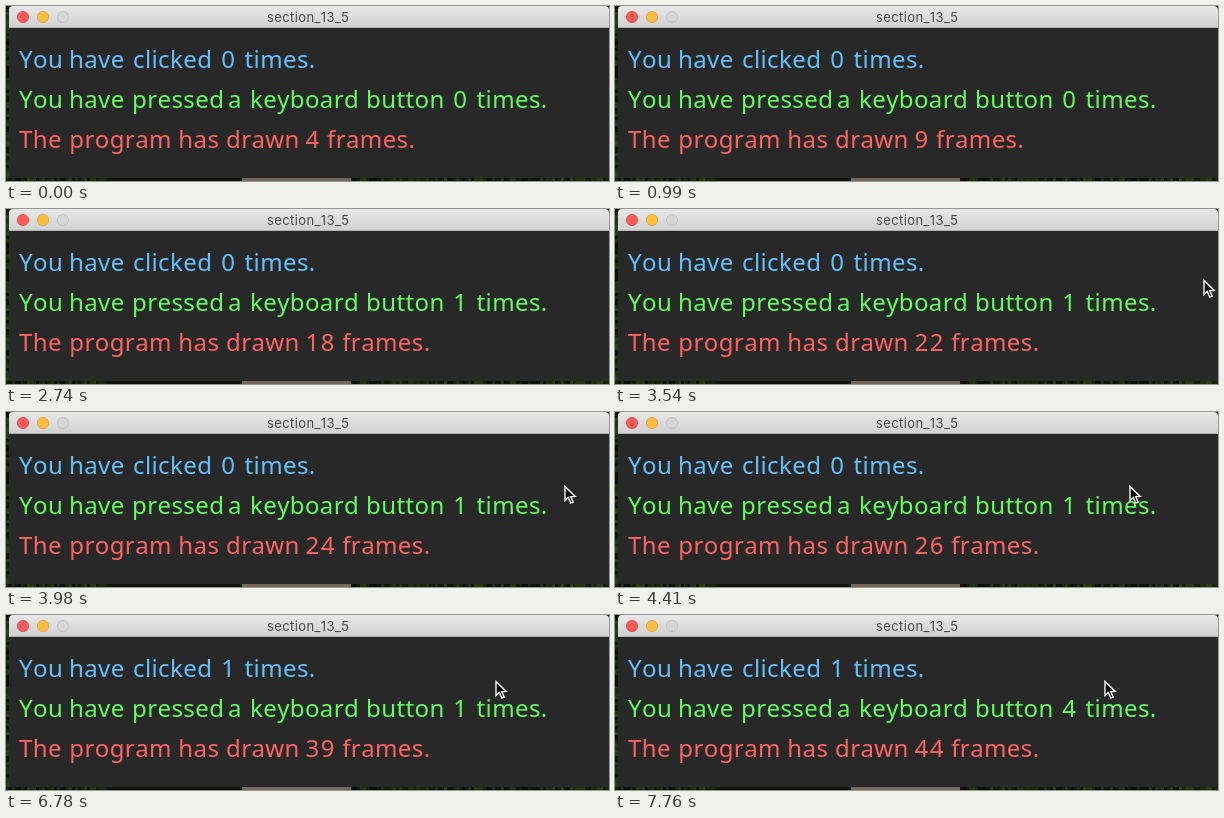
An HTML page with a canvas that plays this animation: 603x175 px, repeating every 8 s.

```html
<!DOCTYPE html>
<html lang="en">
<head>
<meta charset="utf-8">
<title>section_13_5</title>
<style>
html, body { margin: 0; width: 100%; height: 100%; overflow: hidden; background: #282828; }
canvas { display: block; }
</style>
</head>
<body>
<canvas id="stage" width="603" height="175"></canvas>
<script>
const ctx = document.getElementById("stage").getContext("2d");
const LOOP = 8000;
const TICK = 87.9;            // ms between screen captures
const TICKS_PER_DRAW = 2.22;  // the sketch redraws more slowly than that
const DIGIT_STEP = 15.2;
const BLUE = "#60c2ff", GREEN = "#60ff5c", RED = "#ff6260";

// Events, in ticks
const keyPresses = [30, 84, 86, 88];
const clicks = [55];

// Pointer key points: tick, x, y
const path = [[39, 598, 71], [40, 588, 70], [48, 540, 74], [50, 514, 73], [54, 489, 65]];

const countAt = (events, tick) => events.filter(e => e <= tick).length;

const drawnAt = tick => 4 + Math.min(40, Math.ceil((tick - 1.2) / TICKS_PER_DRAW));

function pointerAt(tick) {
  const next = path.findIndex(p => p[0] > tick);
  if (next === 0) return null;
  if (next < 0) return path[path.length - 1].slice(1);
  const [a, b] = [path[next - 1], path[next]];
  const k = (tick - a[0]) / (b[0] - a[0]);
  return [1, 2].map(i => Math.round(a[i] + (b[i] - a[i]) * k));
}

function seeded(seed) {
  return () => (seed = (seed * 16807) % 2147483647) / 2147483647;
}

function rect(x, y, w, h, color) {
  ctx.fillStyle = color;
  ctx.fillRect(x, y, w, h);
}

function disc(x, y, fill, line) {
  ctx.beginPath();
  ctx.arc(x, y, 5.6, 0, Math.PI * 2);
  ctx.fillStyle = fill;
  ctx.fill();
  ctx.lineWidth = 0.8;
  ctx.strokeStyle = line;
  ctx.stroke();
}

// Grass and ground showing around the window
function drawDesktop() {
  const random = seeded(41);
  const grass = (x, y, w, h) => {
    const v = 10 + 45 * random();
    rect(x, y, w, h, `rgb(${v * 0.8}, ${v * 1.1}, ${v * 0.35})`);
  };
  rect(0, 0, 603, 175, "#12140c");
  for (let y = 0; y < 175; y += 3) grass(0, y, 3, 3);
  for (let x = 0; x < 603; x += 3) {
    if (x < 102 || x > 345) grass(x, 172, 3, 3);
  }
  rect(236, 172, 109, 3, "#75665a");
}

function drawWindow() {
  rect(3, 20, 600, 152, "#282828");
  const bar = ctx.createLinearGradient(0, 0, 0, 22);
  bar.addColorStop(0, "#e8e8e8");
  bar.addColorStop(1, "#d0d0d0");
  ctx.fillStyle = bar;
  ctx.beginPath();
  ctx.roundRect(3, 0, 600, 22, [4, 4, 0, 0]);
  ctx.fill();
  rect(3, 21, 600, 1, "#b2b2b2");
  disc(17, 11, "#fc5b57", "#df4744");
  disc(37, 11, "#fdbd41", "#de9f34");
  disc(57, 11, "#d6d6d6", "#bfbfbf");
  ctx.font = "13px Inter, Roboto, sans-serif";
  ctx.letterSpacing = "0.4px";
  ctx.textAlign = "center";
  ctx.fillStyle = "#484848";
  ctx.fillText("section_13_5", 302.2, 16);
}

// Words alternate with the x of their starting point
function drawWords(color, y, ...parts) {
  ctx.font = '24px "Noto Sans", "Open Sans", sans-serif';
  ctx.fontKerning = "none";
  ctx.letterSpacing = "0.4px";
  ctx.textAlign = "left";
  ctx.fillStyle = color;
  for (let i = 0; i < parts.length; i += 2) ctx.fillText(parts[i], parts[i + 1], y);
}

function drawNumber(color, value, x, y) {
  [...String(value)].forEach((d, i) => drawWords(color, y, d, x + i * DIGIT_STEP));
}

function drawPointer(x, y) {
  ctx.save();
  ctx.translate(x, y);
  ctx.beginPath();
  ctx.moveTo(1, 1.5);
  ctx.lineTo(1, 15.6);
  ctx.lineTo(4.3, 12.5);
  ctx.lineTo(6.8, 18.2);
  ctx.lineTo(9.2, 17.2);
  ctx.lineTo(6.7, 11.6);
  ctx.lineTo(11.2, 11.4);
  ctx.closePath();
  ctx.fillStyle = "#0c0c0c";
  ctx.fill();
  ctx.lineWidth = 1.4;
  ctx.strokeStyle = "#f4f4f4";
  ctx.stroke();
  ctx.restore();
}

function draw(t) {
  const tick = Math.floor(t / TICK);
  const drawn = drawnAt(tick);
  const shift = drawn > 9 ? DIGIT_STEP : 0;

  drawDesktop();
  drawWindow();

  drawWords(BLUE, 62, "You", 13, "have", 63, "clicked", 127, "times.", 238.5);
  drawNumber(BLUE, countAt(clicks, tick), 215.3, 62);

  drawWords(GREEN, 102, "You", 13, "have", 63, "pressed", 126, "a", 222,
    "keyboard", 244, "button", 360, "times.", 470.5);
  drawNumber(GREEN, countAt(keyPresses, tick), 447.3, 102);

  drawWords(RED, 142, "The", 13, "program", 63.3, "has", 172.3, "drawn", 220,
    "frames.", 321 + shift);
  drawNumber(RED, drawn, 299.6, 142);

  const pointer = pointerAt(tick);
  if (pointer) drawPointer(...pointer);
}

const start = performance.now();
function loop() {
  draw((performance.now() - start) % LOOP);
  requestAnimationFrame(loop);
}
loop();
</script>
</body>
</html>
```
